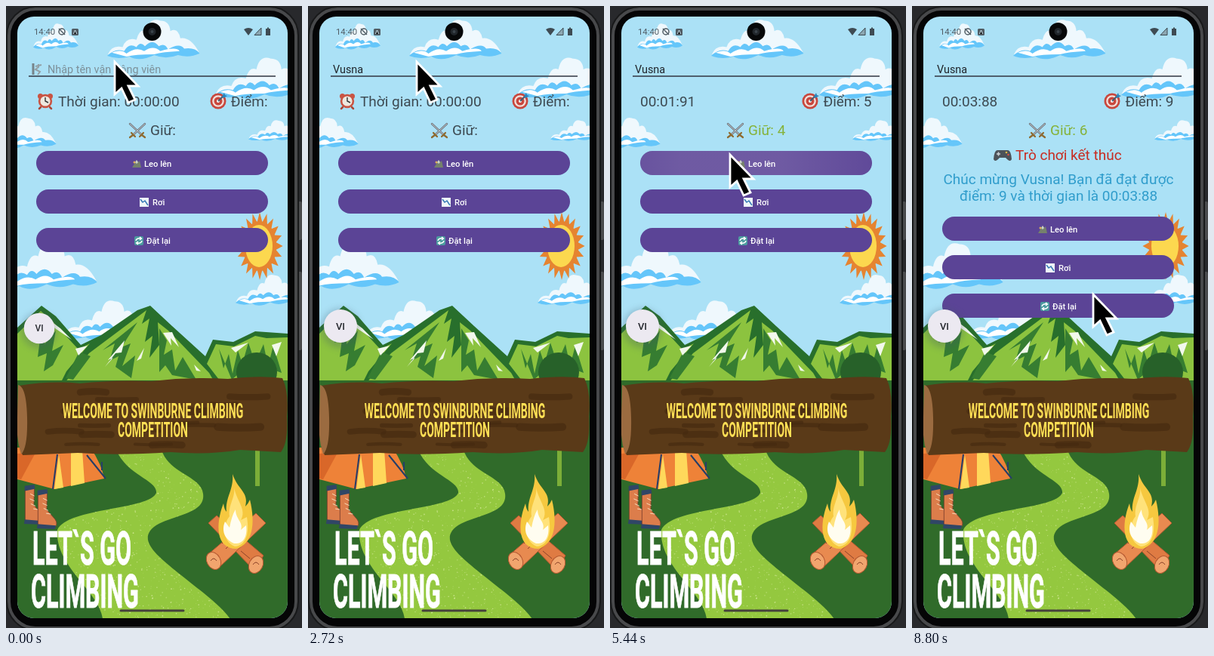
An HTML page that plays this animation: 392 px wide and 824 px high, repeating every 8880 ms.

```html
<!DOCTYPE html>
<html lang="vi">
<head>
<meta charset="utf-8">
<title>Climbing score app</title>
<style>
  html, body { margin: 0; width: 100%; height: 100%; overflow: hidden; background: #28292c; }
  svg { display: block; }
  text { font-family: Roboto, "Noto Sans", sans-serif; }
  .info { font-size: 19px; fill: #3d4a52; }
  .field { font-size: 14.4px; fill: #20252b; }
  .label { font-size: 11.2px; font-weight: 500; fill: #fff; }
  .poster { font-family: "Liberation Sans", Arial, sans-serif; font-weight: 700; }
  .mid { text-anchor: middle; }
  .end { text-anchor: end; }
</style>
</head>
<body>
<svg width="392" height="824" viewBox="0 0 392 824">
  <defs>
    <clipPath id="screen"><rect x="15" y="14" width="358" height="797" rx="22"/></clipPath>
    <clipPath id="pill"><rect width="307" height="32" rx="16"/></clipPath>
    <clipPath id="trailClip"><use href="#trail"/></clipPath>
    <path id="trail" d="M146 588 H206 C216 620 258 622 261 646 C265 674 218 674 196 690 C174 708 200 728 228 751 C258 775 284 794 297 812 H128 C124 776 64 742 68 694 C82 664 190 668 199 645 C201 628 160 622 146 588Z"/>
    <filter id="soft" x="-50%" y="-50%" width="200%" height="200%"><feGaussianBlur stdDeviation="5"/></filter>
    <radialGradient id="glow"><stop offset=".3" stop-color="#fff"/><stop offset="1" stop-color="#fff" stop-opacity="0"/></radialGradient>
    <g id="cloud">
      <path fill="#eff8fd" d="M1 49 Q6 37 20 40 Q25 27 38 31 Q42 16 51 20 Q55 2 69 7 Q81 7 82 20 Q92 15 95 29 Q108 27 119 46 L92 49 Q60 43 30 52Z"/>
      <path fill="#65c6fa" d="M0 51 Q10 41 22 45 Q28 34 38 40 Q43 32 49 39 Q59 29 67 39 Q75 34 79 43 Q94 34 100 42 Q114 40 120 48 Q107 54 92 50 Q76 56 61 50 Q42 59 29 52 Q13 56 0 51Z"/>
      <path fill="#fff" d="M6 47 Q18 42 25 48 Q38 39 48 45 Q60 37 69 45 Q90 39 94 45 Q72 46 61 49 Q36 49 25 52Z"/>
    </g>
    <g id="alarm">
      <path stroke="#aa4938" stroke-width="2.500" stroke-linecap="round" d="M-6 8 L-8 10 M6 8 L8 10"/>
      <circle cx="-6.500" cy="-6.500" r="3.500" fill="#c95443"/><circle cx="6.500" cy="-6.500" r="3.500" fill="#c95443"/>
      <circle r="7.900" fill="#eee8df" stroke="#c95443" stroke-width="2.600"/>
      <path fill="none" stroke="#333" stroke-width="1.400" d="M0 -5 V0 L4 2"/>
    </g>
    <g id="target">
      <circle r="10.500" fill="#c8473d"/><circle r="7.800" fill="#f1dfda"/><circle r="5.500" fill="#c8473d"/><circle r="2" fill="#fff"/>
      <path stroke="#415b72" stroke-width="2" d="M0 0 L7 -7"/><path fill="#2c83b8" d="M5 -6 L8 -11 L9 -8 L12 -7 L7 -4Z"/>
    </g>
    <g id="swords" stroke-linecap="round">
      <path stroke="#697078" stroke-width="2.400" d="M-10 -9 L6 6 M10 -9 L-6 6"/>
      <path stroke="#cfd5d8" d="M-10 -9 L5 5 M10 -9 L-5 5"/>
      <path stroke="#8e692e" stroke-width="2.200" d="M3 8 L8 3 M-3 8 L-8 3 M6 6 L10 9 M-6 6 L-10 9"/>
    </g>
    <g id="gamepad">
      <path fill="#4c5259" d="M-7 -6 H7 Q11 -6 12 6 Q10 11 4 4 H-4 Q-10 11 -12 6 Q-11 -6 -7 -6Z"/>
      <path stroke="#d0d4d7" stroke-width="1.600" d="M-8 -1 H-3 M-5.500 -3.500 V1.500"/>
      <circle cx="5" cy="-3" r="1.300" fill="#e3ba44"/><circle cx="7.500" cy="0" r="1.300" fill="#d84e42"/>
    </g>
    <g id="ridge"><path fill="#75816c" d="M-6 5 L0 -5 L2 -2 L4 -4 L6 5Z"/><path fill="#cad3ca" d="M-2 -2 L0 -5 L2 -2 L0 0Z"/><circle cx="-3" cy="-2" r="1.500" fill="#dcb05c"/></g>
    <g id="chart"><rect x="-6" y="-6" width="12" height="12" fill="#eef5f7"/><path fill="none" stroke="#3579b5" stroke-width="1.500" d="M-5 -4 L-2 0 L1 -2 L5 4"/></g>
    <g id="reset"><rect x="-6" y="-6" width="12" height="12" rx="2" fill="#4c9b9f"/><path fill="none" stroke="#fff" stroke-width="1.400" d="M-4 0 Q-3 -4 3 -3 M1 -5 L3.500 -3 L1 -1 M4 0 Q3 4 -3 3 M-1 5 L-3.500 3 L-1 1"/></g>
    <g id="boot" stroke="#783d2c">
      <path fill="#dc7d4b" d="M27 642 L45 640 L44 666 L60 679 Q66 685 61 690 L27 688Z"/>
      <path fill="#304666" stroke="none" d="M26 639 L45 637 L46 643 L26 646Z M26 686 L62 688 L60 693 L25 692Z"/>
      <path fill="none" stroke="#fff0d0" d="M37 650 L45 653 M36 657 L45 660 M38 664 L47 667 M43 671 L52 672"/>
    </g>
  </defs>

  <!-- phone body -->
  <rect width="392" height="824" fill="#28292c"/>
  <path fill="#4a4b4d" d="M387 259 h3 q2 0 2 3 v45 q0 3 -2 3 h-3z M387 352 h3 q2 0 2 3 v98 q0 3 -2 3 h-3z"/>
  <rect x="1" y="1" width="386" height="826" rx="38" fill="#050506" stroke="#18191a" stroke-width="2"/>
  <rect x="4" y="4" width="380" height="820" rx="35" fill="none" stroke="#48494b" stroke-width="4"/>

  <g clip-path="url(#screen)">
    <rect x="15" y="14" width="358" height="797" fill="#abe1f6"/>
    <g id="clouds"></g>
    <path id="rays" fill="#e58431"/>
    <ellipse cx="336" cy="318" rx="22" ry="33" fill="#e58431"/>
    <ellipse cx="335" cy="318" rx="18" ry="28" fill="#fcd84f"/>

    <!-- mountains -->
    <path fill="#286f2c" d="M15 426 L47 397 L66 411 L99 449 L126 436 L174 403 L191 397 L220 424 L264 464 L274 442 L301 445 L330 431 L373 434 V510 H15Z"/>
    <g fill="#8cc33f">
      <path d="M15 434 L46 404 L61 417 L96 455 L111 447 L80 484 L72 500 H15Z"/>
      <path d="M77 500 L110 460 L186 403 L180 421 L190 414 L184 445 L194 437 L190 466 L203 449 L201 419 L215 430 L269 486 L277 500Z"/>
      <path d="M266 474 L278 448 L302 451 L330 437 L345 440 L373 439 V500 H286Z"/>
    </g>
    <path fill="#367d31" d="M46 407 L42 431 L54 425 L51 448 L66 430 L61 457 L76 449 L62 476 L50 484 L54 460 L42 465 L45 442 L35 446Z M174 419 L153 452 L165 447 L154 477 L171 463 L166 493 L145 478 L149 464 L137 470 L144 447 L128 456Z M203 427 L213 443 L209 462 L220 455 L224 483 L234 465 L252 495 L220 489 L211 476 L203 485Z M97 458 L112 464 L89 495 L79 493Z M282 454 L288 480 L295 461 L300 487 L307 456 L313 474 L321 446 L330 473 L341 448 L347 477 L354 450 L365 486 L354 482 L346 499 L337 479 L326 494 L314 482 L299 495Z"/>
    <path fill="#f2f8ec" d="M157 443 L135 469 L142 466 L131 478 L145 460 L153 459Z M208 433 L219 450 L218 440 L229 452 L220 432Z M52 412 L72 427 L87 442 L65 427Z M92 454 L108 450 L96 463Z M298 453 L321 446 L304 459Z M352 449 L365 445 L358 464Z M249 475 L258 484 L252 483Z M183 453 L173 470 L179 467Z"/>

    <!-- ground -->
    <rect x="15" y="496" width="358" height="316" fill="#306b2a"/>
    <ellipse cx="332" cy="485" rx="27" ry="26" fill="#276129"/>
    <use href="#trail" fill="#94c83f"/>
    <g id="specks" clip-path="url(#trailClip)" fill="#e0efaa"></g>
    <path fill="#7cae38" d="M330 570 h6 v66 h-6z"/>

    <!-- tent -->
    <path fill="#ee8238" d="M15 585 H112 Q127 608 130 626 L64 640 L15 627Z"/>
    <path fill="#ffd85b" d="M86 588 H101 L104 632 L86 636Z M70 594 L76 638 L64 640Z"/>
    <path fill="#d96729" d="M15 593 L39 592 L20 627 L15 626Z"/>
    <path fill="none" stroke="#263e68" stroke-width="2" d="M68 594 L62 640 M107 595 L132 626 M127 604 V615"/>

    <use href="#boot" transform="translate(7 32) scale(.68 .945)"/>
    <use href="#boot" transform="translate(24 38) scale(.68 .945)"/>

    <!-- campfire -->
    <g stroke="#b55931">
      <path fill="#df7b43" d="M268 685 L279 675 L341 728 L329 748Z"/>
      <path fill="#e88a50" d="M331 672 L344 685 L282 744 L267 727Z"/>
      <ellipse cx="275" cy="735" rx="9" ry="12" fill="#f1a56e" transform="rotate(-28 275 735)"/>
      <ellipse cx="331" cy="740" rx="9" ry="12" fill="#f1a56e" transform="rotate(28 331 740)"/>
      <path fill="none" stroke="#8c4329" d="M286 712 L300 699 M291 719 L310 701 M311 722 L323 732 M271 735 q4 -6 8 0 M327 740 q4 -6 8 0"/>
    </g>
    <path fill="#f6c83f" d="M300 620 C307 641 322 644 317 663 Q321 659 323 654 C331 687 326 713 305 719 C278 719 277 687 288 659 Q289 667 292 670 C290 651 302 641 300 620Z"/>
    <path fill="#ffe27a" d="M302 638 C306 657 319 667 311 681 L319 677 C323 700 317 715 303 716 C286 709 287 687 296 676 C294 660 304 652 302 638Z"/>
    <path fill="#fffdf0" d="M304 667 C304 680 315 684 311 694 L318 688 C320 704 314 713 302 712 C285 704 287 690 290 683 L296 691 Q299 675 304 667Z"/>

    <!-- log -->
    <path fill="#5a3a18" d="M17 503 Q60 496 98 500 Q141 495 193 497 Q244 491 294 494 Q335 489 366 493 Q375 512 372 544 Q374 578 364 591 L310 588 Q266 595 218 591 Q150 596 95 592 L22 595 Q13 576 15 544Z"/>
    <g id="grain" fill="none" stroke="#462a10" stroke-linecap="round"></g>
    <path fill="#9b6b40" d="M16 502 Q27 504 28 545 Q29 585 20 594 Q13 572 15 545Z"/>

    <g class="poster mid" fill="#ffe055" font-size="28" transform="translate(194.500) scale(.5 1)">
      <text y="546">WELCOME TO SWINBURNE CLIMBING</text>
      <text y="571">COMPETITION</text>
    </g>
    <g class="poster" fill="#fff" stroke="#fff" font-size="61" transform="translate(33) scale(.5 1)">
      <text x="4" y="740">LET`S GO</text>
      <text y="797">CLIMBING</text>
    </g>

    <!-- status bar -->
    <text x="37" y="38" font-size="11.300" fill="#505c64">14:40</text>
    <g fill="none" stroke="#505c64" stroke-width="1.500"><circle cx="74" cy="34" r="4"/><path d="M70 30 L78 38"/></g>
    <rect x="87" y="30" width="9" height="9" rx="1.500" fill="#505c64"/>
    <path stroke="#d6eef7" d="M89.500 37 L91.500 32 L93.500 37"/>
    <path fill="#3e4b53" d="M315 31 Q321 27 327 31 L321 39Z M344 30 h2 v-1.500 h2 v1.500 h2 v9 h-6z"/>
    <path fill="#8ca7b2" stroke="#3e4b53" d="M329 38.500 H338 V29Z"/>
    <path stroke="#45423b" stroke-width="3" stroke-linecap="round" d="M152 801 H235"/>

    <!-- form -->
    <g id="hint">
      <path fill="none" stroke="#77848a" stroke-width="3" d="M36 76 V91"/>
      <path fill="none" stroke="#93a0a6" stroke-width="2" d="M43 77 V81 L39 84 L45 87 L42 91 M39 80 L47 78"/>
      <text x="55" y="88.500" class="field" style="fill:#7c9099">Nhập tên vận động viên</text>
    </g>
    <text id="entry" x="33" y="88.500" class="field"></text>
    <path id="caret" stroke="#262a30" stroke-width="1.500" d="M0 74 V91"/>
    <path stroke="#303440" stroke-width="1.600" d="M30 93 H357"/>
    <use id="clockIcon" href="#alarm" x="52" y="126"/>
    <text id="clock" class="info" y="132.500"></text>
    <use id="scoreIcon" href="#target" y="126"/>
    <text id="score" class="info end" x="346.500" y="132.500"></text>
    <use id="holdIcon" href="#swords" y="165"/>
    <text id="hold" class="info" y="171"></text>
    <g id="result">
      <use href="#gamepad" x="120" y="197"/>
      <text x="137" y="204" class="info" style="fill:#c72d22">Trò chơi kết thúc</text>
      <g class="info mid" style="fill:#309dcc">
        <text x="194" y="236" id="praise"></text>
        <text x="194" y="258">điểm: 9 và thời gian là 00:03:88</text>
      </g>
    </g>
    <g id="buttons"></g>

    <g id="badge">
      <circle r="26" cy="3" fill="#415866" opacity=".3" filter="url(#soft)"/>
      <circle r="22" fill="#ece9f1"/>
      <text class="mid" y="4.500" font-size="13" font-weight="500" fill="#282a30">VI</text>
    </g>
  </g>

  <circle cx="193.500" cy="34" r="12" fill="#070809"/>
  <circle cx="193.500" cy="34" r="5" fill="#20252a"/><circle cx="193.500" cy="34" r="2" fill="#3b434a"/>
  <path id="pointer" fill="#000" stroke="#fff" stroke-width="2.800" d="M1 2 V45 L10 37 L19 56 L28 52 L19 34 H32Z"/>
</svg>

<script>
const LOOP = 8880, STEP = 80, NAME = "Vusna";
const KEY_TIMES = [800, 1040, 1280, 1520, 1840];
const CLIMBS = [3560, 4300, 4800, 5300, 5800, 6300];
const FALL = 7389, DROP = 87;
const byId = id => document.getElementById(id);
const show = (id, on) => byId(id).style.display = on ? "" : "none";
const place = (el, x, y, more = "") => el.setAttribute("transform", `translate(${x} ${y}) ${more}`);

// x, y, horizontal scale, vertical scale
byId("clouds").innerHTML = [
  [36, 19, .5, .7], [134, 12, 1.02, 1.06], [277, 62, 1.07, 1.1], [-21, 143, .73, .83],
  [321, 148, .58, .56], [-15, 307, 1.13, 1.23], [304, 351, .75, .83], [77, 384, .97, 1.05]
].map(([x, y, w, h]) => `<use href="#cloud" transform="translate(${x} ${y}) scale(${w} ${h})"/>`).join("");

byId("rays").setAttribute("d", "M" + Array.from({ length: 40 }, (_, i) => {
  const angle = i * Math.PI / 20, r = i % 2 ? 32 : 45;
  return `${336 + r * .68 * Math.cos(angle)} ${318 + r * Math.sin(angle)}`;
}).join("L") + "Z");

let seed = 7;
const random = () => (seed = seed * 16807 % 2147483647) / 2147483647;
byId("specks").innerHTML = Array.from({ length: 1100 }, () =>
  `<circle cx="${70 + random() * 225}" cy="${590 + random() * 222}" r="${.3 + random() * .6}" opacity="${.25 + random() * .5}"/>`).join("");
byId("grain").innerHTML = Array.from({ length: 17 }, () => {
  const x = 38 + random() * 260, y = 508 + random() * 74, length = 25 + random() * 38;
  return `<path stroke-width="${4 + random() * 7}" opacity=".65" d="M${x} ${y} q${length / 2} ${random() * 6 - 3} ${length} 0"/>`;
}).join("");

const buttons = [["ridge", "Leo lên", 133, 143], ["chart", "Rơi", 143, 154], ["reset", "Đặt lại", 136, 146]];
byId("buttons").innerHTML = buttons.map(([icon, label, iconX, textX]) => `<g clip-path="url(#pill)">
  <rect width="307" height="32" fill="#5b4496"/><circle fill="url(#glow)" cy="16"/>
  <use href="#${icon}" x="${iconX}" y="17"/><text class="label" x="${textX}" y="20.500">${label}</text></g>`).join("");
const buttonNodes = [...byId("buttons").children];
const presses = [...CLIMBS.map(t => [t - 120, 0, 120]), [FALL - 60, 1, 145]];

byId("praise").textContent = `Chúc mừng ${NAME}! Bạn đã đạt được`;

const stops = [[0, 143, 72], [2800, 143, 72], [3400, 158, 195], [6640, 158, 195],
  [7300, 183, 257], [7600, 183, 257], [8480, 239, 380], [LOOP, 239, 380]];
function pointerAt(t) {
  const i = stops.findIndex(stop => stop[0] > t);
  const [t0, x0, y0] = stops[i - 1], [t1, x1, y1] = stops[i];
  const p = (t - t0) / (t1 - t0), e = p * p * (3 - 2 * p);
  return [x0 + (x1 - x0) * e, y0 + (y1 - y0) * e];
}

function timeText(t) {
  const total = Math.min(388, Math.max(0, Math.round(69 + (t - 4240) * 235 / 2320)));
  const pad = n => String(n).padStart(2, "0");
  return `00:${pad(Math.floor(total / 100))}:${pad(total % 100)}`;
}

function drawRipple(node, index, t) {
  const press = presses.filter(([at, b]) => b === index && at <= t).pop();
  const age = press ? t - press[0] : 1e4;
  const ripple = node.querySelector("circle");
  ripple.setAttribute("cx", press ? press[2] : 0);
  ripple.setAttribute("r", 30 + Math.min(1, age / 340) * 260);
  ripple.setAttribute("opacity", .12 * Math.max(0, Math.min(1, (650 - age) / 250)));
}

function draw(t) {
  const typed = KEY_TIMES.filter(at => at <= t).length;
  const holds = CLIMBS.filter(at => at <= t).length;
  const score = holds <= 3 ? holds : 3 + 2 * (holds - 3);
  const over = t >= FALL;

  show("hint", !typed);
  const entry = byId("entry");
  entry.textContent = NAME.slice(0, typed);
  const lastKey = typed ? KEY_TIMES[typed - 1] : 480;
  show("caret", t >= 480 && (t - lastKey) % 1000 < 500);
  place(byId("caret"), 34 + (typed ? entry.getComputedTextLength() : 0), 0);

  show("clockIcon", !holds);
  byId("clock").setAttribute("x", holds ? 40 : 69);
  byId("clock").textContent = (holds ? "" : "Thời gian: ") + timeText(t);
  byId("scoreIcon").setAttribute("x", holds ? 265 : 281);
  byId("score").textContent = "Điểm:" + (holds ? " " + score : "");
  byId("holdIcon").setAttribute("x", holds ? 166 : 174);
  const hold = byId("hold");
  hold.setAttribute("x", holds ? 183 : 191);
  hold.textContent = "Giữ:" + (holds ? " " + holds : "");
  hold.style.fill = !holds ? "" : holds <= 3 ? "#309dcc" : "#85b23a";

  show("result", over);
  buttonNodes.forEach((node, i) => {
    place(node, 40, 192 + 51 * i + (over ? DROP : 0));
    drawRipple(node, i, t);
  });

  const grow = Math.max(0, Math.min(1, (t - 480) / 160));
  place(byId("badge"), 44 - grow, 427 - 3 * grow, `scale(${.92 + .08 * grow})`);
  place(byId("pointer"), ...pointerAt(t));
}

function tick() {
  draw(Math.floor(performance.now() % LOOP / STEP) * STEP);
  requestAnimationFrame(tick);
}
tick();
</script>
</body>
</html>
```
